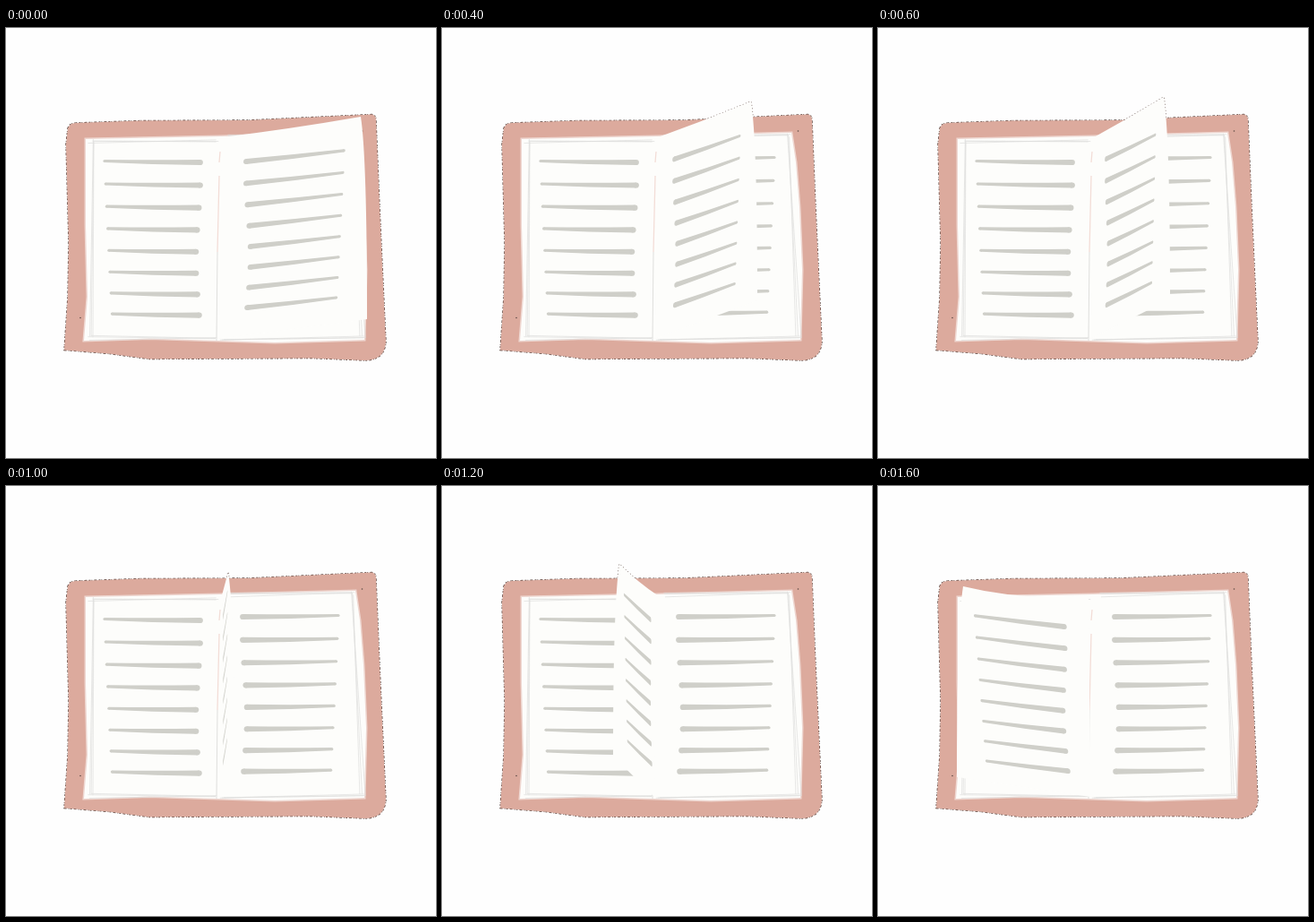
Recreate the animation shown at these times as an HTML page with a canvas. Size 480 px wide and 480 px high, loop 1.8 s.

```html
<!DOCTYPE html>
<html lang="en">
<head>
<meta charset="utf-8">
<title>Turning page</title>
<style>
  html, body { margin: 0; width: 100%; height: 100%; overflow: hidden; background: #fefefe; }
  canvas { display: block; width: 100%; height: 100%; }
</style>
</head>
<body>
<canvas id="stage" width="480" height="480"></canvas>
<script>
const ctx = document.getElementById('stage').getContext('2d');
const STEP = 200, ROWS = 8, HINGE = 241;
const PAPER = '#fdfdfb', PINK = '#dcaa9d', INK = '#cfcfc9', EDGE = '#5f4a44', PENCIL = '#dfdfdd';

const cover = new Path2D(`M67 130L69 112Q71 106 78 106L150 103.5L270 103L408 96.5Q413 97 413 103
  L417 200L424 350Q423 371 400 371L340 368.5L160 369.5L115 363.5L65 359.5L69 300L70 240Z`);
const sheet = new Path2D(`M89 124L240 121L390 117L395 150L399 200L402 270L400 348L300 351
  L237 349L160 346.5L87 349L91 300L89 220Z`);

// The page's top corner in each drawing; the rest of the page follows from it.
const tips = [[396, 99], [375, 87], [345, 82], [319, 77], [284, 87], [248, 96], [198, 87], [128, 94], [95, 112]];

// Each side's text block: strokes taper from the inner end to the outer end.
const right = { dir: 1, inner: 266.5, outer: 371, top: 146, pitch: 26, span: 155, width: 1.02, sag: 2, textY: 149, rise: 3 };
const left = { dir: -1, inner: 214.5, outer: 110, top: 150, pitch: 25.7, span: 146, width: .93, sag: 12, textY: 157, rise: 8 };

let seed = 7;
function jitter(size) {
  seed = seed * 16807 % 2147483647;
  return (seed / 2147483647 - .5) * size;
}

const pencil = new Path2D();
function sketch(x1, y1, x2, y2) {
  for (let i = 0; i < 3; i++) {
    pencil.moveTo(x1 + jitter(7), y1 + jitter(6));
    pencil.lineTo(x2 + jitter(7), y2 + jitter(4));
  }
}
sketch(95, 126, 236, 126);
sketch(246, 122, 388, 119);
sketch(95, 125, 96, 345);
sketch(386, 119, 398, 345);
sketch(92, 346, 235, 347);
sketch(240, 348, 399, 345);

function fill(path, color) {
  ctx.fillStyle = color;
  ctx.fill(path);
}

function stroke(path, color, width, dash = []) {
  ctx.strokeStyle = color;
  ctx.lineWidth = width;
  ctx.setLineDash(dash);
  ctx.stroke(path);
}

function disc(x, y, radius, color) {
  const p = new Path2D();
  p.arc(x, y, radius, 0, 7);
  fill(p, color);
}

function drawBrush(x1, y1, x2, y2) {
  const midX = (x1 + x2) / 2, midY = (y1 + y2) / 2;
  const p = new Path2D();
  p.moveTo(x1, y1 - 3.1);
  p.quadraticCurveTo(midX, midY - 1.8, x2, y2 - 1.6);
  p.lineTo(x2, y2 + 1.6);
  p.quadraticCurveTo(midX, midY + 3.2, x1, y1 + 3.1);
  fill(p, INK);
  disc(x1, y1, 3.1, INK);
  disc(x2, y2, 1.6, INK);
}

function drawLines({ dir, inner, outer, top, pitch }) {
  for (let i = 0; i < ROWS; i++) {
    const y = top + pitch * i - .19 * i * i;
    const innerX = inner - dir * 2.5 * Math.cos(.8 * i - .4);
    drawBrush(innerX, y, outer - dir * 1.2 * i, y - 1.5);
  }
}

function makePose([tipX, tipY]) {
  const side = tipX > HINGE ? right : left;
  const reach = Math.abs(tipX - HINGE) / side.span;
  const lift = Math.sqrt(Math.sqrt(1 - reach * reach));
  const spine = side === right ? HINGE : HINGE + 2 - 8 * reach;
  const footX = tipX + side.dir * 7;

  const page = new Path2D();
  page.moveTo(spine, 122);
  page.quadraticCurveTo((spine + tipX) / 2, (122 + tipY) / 2 + side.sag * reach, tipX, tipY);
  page.quadraticCurveTo(footX, tipY + 45, footX, 325 - 24 * lift);
  page.lineTo(237, 347);
  page.closePath();

  const slope = -side.dir * (.1 + .15 * lift);
  const lean = side === left ? .03 * reach : 0;
  const text = [side.width * reach, slope, lean, .945,
    spine + side.dir * 27 * reach, side.textY - side.rise * lift];
  return { side, page, text };
}

function draw({ side, page, text }) {
  ctx.fillStyle = '#fefefe';
  ctx.fillRect(0, 0, 480, 480);

  // The cover hides the page outline except where the page sticks out.
  stroke(page, EDGE, 1.3, [1, 2.5]);
  stroke(cover, EDGE, 1.4, [2, 1, 1, 2, 3, 2]);
  fill(cover, PINK);
  disc(397.5, 115, .8, EDGE);
  disc(83, 323.5, .8, EDGE);

  stroke(sheet, 'rgba(253,251,250,.55)', 3);
  fill(sheet, PAPER);
  stroke(pencil, PENCIL, .7);
  stroke(new Path2D('M236 250L235 349'), PENCIL, 1);
  stroke(new Path2D('M239 138L238 150M238 165L236 250'), '#f3ddd7', 1.3);
  drawLines(left);
  drawLines(right);

  fill(page, PAPER);
  ctx.save();
  ctx.transform(...text);
  ctx.translate(-side.inner + side.dir * 2.5, -side.top);
  drawLines(side);
  ctx.restore();
}

const poses = tips.map(makePose);

function tick() {
  draw(poses[Math.floor(performance.now() / STEP) % poses.length]);
  requestAnimationFrame(tick);
}
tick();
</script>
</body>
</html>
```
